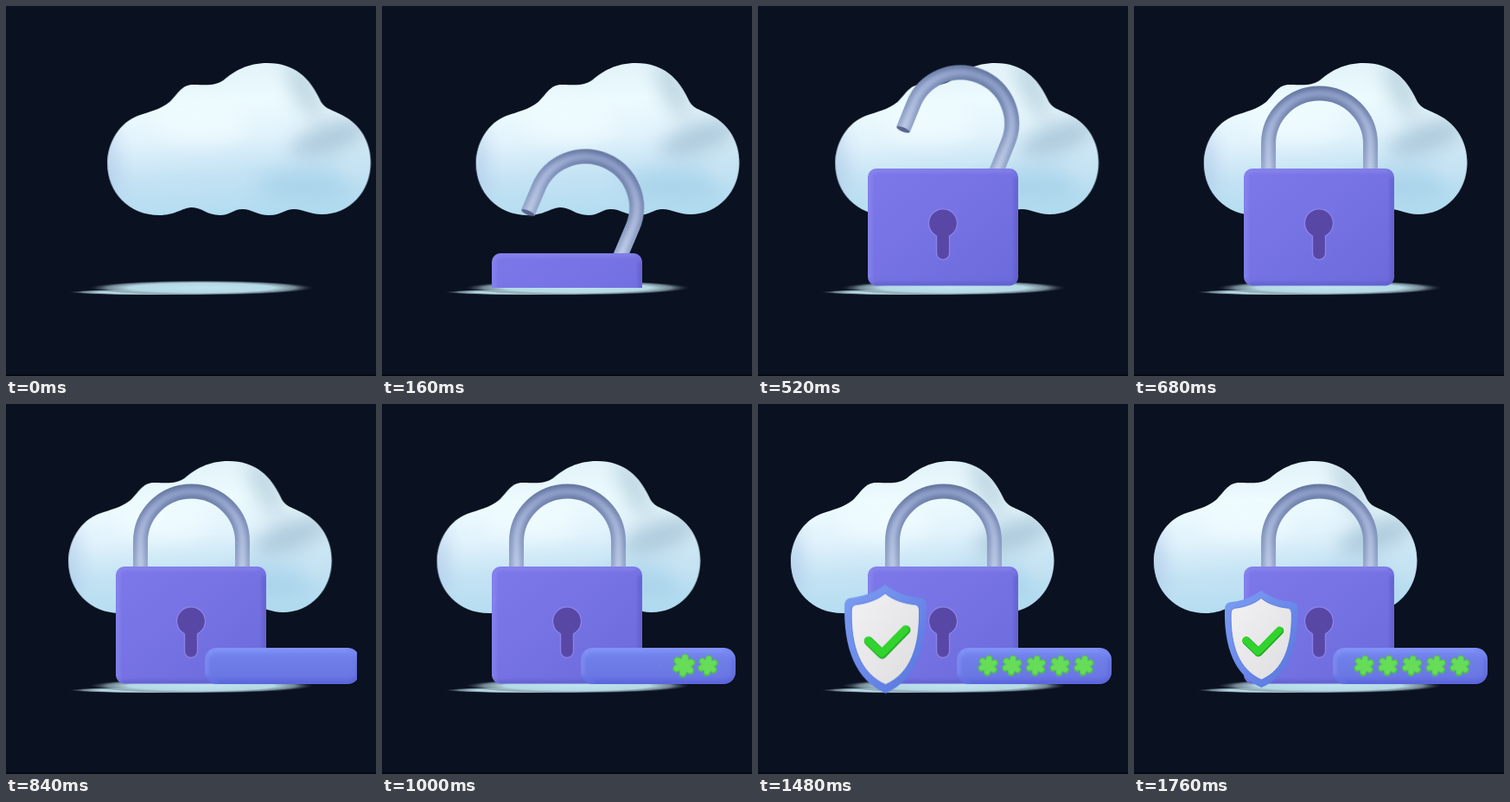
An HTML page that plays this animation: 428 px wide and 428 px high, repeating every 1.8 s.

```html
<!DOCTYPE html>
<html lang="en">
<head>
<meta charset="utf-8">
<title>Cloud security</title>
<style>
  html, body { margin: 0; width: 100%; height: 100%; overflow: hidden; background: #0a1120; }
  svg { display: block; width: 100vw; height: 100vh; }
  #shackle { transform-origin: 286px 199px; }
  #shield { transform-origin: 147px 271px; }
</style>
</head>
<body>
<svg viewBox="0 0 428 428">
  <defs>
    <linearGradient id="sky" x1=".42" y1="0" x2=".55" y2="1">
      <stop offset="0" stop-color="#e2f2f9"/>
      <stop offset=".25" stop-color="#ecfbfe"/>
      <stop offset=".48" stop-color="#e2f3fc"/>
      <stop offset=".72" stop-color="#c4e3f4"/>
      <stop offset="1" stop-color="#b2dcf0"/>
    </linearGradient>
    <radialGradient id="glow">
      <stop offset="0" stop-color="#bfe3ee"/>
      <stop offset=".65" stop-color="#b4d8e4"/>
      <stop offset=".84" stop-color="#8ba3ae" stop-opacity=".8"/>
      <stop offset="1" stop-color="#39424d" stop-opacity="0"/>
    </radialGradient>
    <linearGradient id="steel" gradientUnits="userSpaceOnUse" x1="0" y1="92" x2="0" y2="192">
      <stop offset="0" stop-color="#64769f"/>
      <stop offset=".45" stop-color="#7d8fb9"/>
      <stop offset="1" stop-color="#97a9cc"/>
    </linearGradient>
    <linearGradient id="shine" gradientUnits="userSpaceOnUse" x1="0" y1="92" x2="0" y2="192">
      <stop offset="0" stop-color="#8b9cc8"/>
      <stop offset=".4" stop-color="#a9b8dc"/>
      <stop offset="1" stop-color="#c4d2ea"/>
    </linearGradient>
    <linearGradient id="violet" x1="0" y1="0" x2="1" y2="1">
      <stop offset="0" stop-color="#7d78e9"/>
      <stop offset=".5" stop-color="#7572e3"/>
      <stop offset="1" stop-color="#6c6bdc"/>
    </linearGradient>
    <linearGradient id="indigo" x1="0" y1="0" x2="0" y2="1">
      <stop offset="0" stop-color="#7b8ef6"/>
      <stop offset=".3" stop-color="#6f7ee8"/>
      <stop offset=".75" stop-color="#6b78e3"/>
      <stop offset="1" stop-color="#5f6be2"/>
    </linearGradient>
    <linearGradient id="rim" x1="0" y1="0" x2="1" y2="1">
      <stop offset="0" stop-color="#7d9ef2"/>
      <stop offset=".55" stop-color="#6988ea"/>
      <stop offset="1" stop-color="#5873da"/>
    </linearGradient>
    <linearGradient id="plate" x1="0" y1="0" x2="1" y2="1">
      <stop offset="0" stop-color="#f2f1f4"/>
      <stop offset="1" stop-color="#dededf"/>
    </linearGradient>
    <filter id="soft" x="-60%" y="-60%" width="220%" height="220%"><feGaussianBlur stdDeviation="11"/></filter>
    <filter id="fine" x="-20%" y="-20%" width="140%" height="140%"><feGaussianBlur stdDeviation="2"/></filter>
    <path id="puff" d="M117 182C117 158 131 135 152 127C166 122 178 120 189 111C199 101 203 91 216 91C232 91 240 93 251 86C264 75 279 66 302 66C334 66 351 84 362 107C367 119 375 119 388 126C410 137 421.500 158 421.500 181C421.500 215 397 241 365 241C350 241 344 235 333 235C322 235 318 242 304 242C290 242 284 235 273 235C263 235 259 242 247 242C232 242 226 233 215 233C204 233 196 242 177 242C142 242 117 216 117 182Z"/>
    <path id="bow" d="M155.500 192V159.500A59 58.500 0 0 1 273.500 159.500V212" fill="none"/>
    <path id="crest" d="M147 215.500C137 224 123 228 110 229.500Q105 231 105 237C104 281 116 314 147.500 328C179 314 190 281 189.500 237Q189.500 231 185 229.500C171 228 157 224 147 215.500Z"/>
    <rect id="case" x="127" y="188" width="174" height="135.500" rx="10"/>
    <rect id="bar" x="230" y="282" width="179" height="42" rx="14"/>
    <clipPath id="inPuff"><use href="#puff"/></clipPath>
    <clipPath id="inCase"><use href="#case"/></clipPath>
    <clipPath id="inBar"><use href="#bar"/></clipPath>
    <clipPath id="above"><rect width="428" height="326"/></clipPath>
    <g id="star" fill="none" stroke-linecap="round" transform="rotate(8)">
      <path d="M0-8V8.500M-7.200-4L7.200 4.200M-7.200 4.200L7.200-4" stroke="#4dbf4b" stroke-width="8"/>
      <circle r="7.500" fill="#5fd455"/>
      <path d="M0-8V7.500M-7-4L6.700 3.700M-7 3.700L6.700-4" stroke="#66dc59" stroke-width="6"/>
    </g>
  </defs>

  <rect width="428" height="428" fill="#0a1120"/>
  <rect y="426.500" width="428" height="1.500" fill="#04070e"/>

  <g id="cloud">
    <use href="#puff" fill="url(#sky)"/>
    <g clip-path="url(#inPuff)">
      <g filter="url(#soft)">
        <ellipse cx="376" cy="152" rx="48" ry="17" fill="#9fbfd2" opacity=".75" transform="rotate(-20 376 152)"/>
        <ellipse cx="345" cy="96" rx="13" ry="36" fill="#a6c3d4" opacity=".7" transform="rotate(-25 345 96)"/>
        <ellipse cx="345" cy="208" rx="55" ry="16" fill="#9fcde7" opacity=".65"/>
        <ellipse cx="402" cy="186" rx="18" ry="13" fill="#cfe6f2" opacity=".6"/>
        <ellipse cx="117" cy="185" rx="11" ry="45" fill="#a9c4e6" opacity=".7"/>
        <ellipse cx="225" cy="135" rx="55" ry="22" fill="#f3feff" opacity=".6"/>
      </g>
    </g>
  </g>

  <ellipse cx="176" cy="331" rx="104" ry="3.500" fill="url(#glow)"/>
  <ellipse cx="226" cy="326" rx="130" ry="8.500" fill="url(#glow)"/>

  <g clip-path="url(#above)">
    <g id="lock">
      <g id="shackle">
        <use href="#bow" stroke="url(#steel)" stroke-width="17"/>
        <use href="#bow" stroke="url(#shine)" stroke-width="8" opacity=".85" filter="url(#fine)"/>
        <ellipse cx="155.500" cy="191.500" rx="8" ry="2.500" fill="#56628c"/>
      </g>
      <use href="#case" fill="url(#violet)"/>
      <g clip-path="url(#inCase)">
        <g fill="none" filter="url(#fine)">
          <path d="M129 318V198Q129 190 138 190H294" stroke="#9a98f6" stroke-width="3" opacity=".6"/>
          <path d="M299 198V314Q299 322 290 322H134" stroke="#5a55c2" stroke-width="4" opacity=".7"/>
        </g>
      </g>
      <path d="M206.500 266A16.500 16.500 0 1 1 221.500 266V286A7.500 7.500 0 0 1 206.500 286Z"
            fill="#5847a5" stroke="#8a82ea" stroke-width="1.400"/>
    </g>
  </g>

  <g id="pill">
    <use href="#bar" fill="url(#indigo)"/>
    <g clip-path="url(#inBar)" fill="none" filter="url(#fine)">
      <path d="M232 314V297Q232 284 246 284H394" stroke="#8b9ffc" stroke-width="3" opacity=".7"/>
      <path d="M407 295V309Q407 322 394 322H246" stroke="#5158cc" stroke-width="3" opacity=".6"/>
    </g>
  </g>
  <g id="stars"></g>

  <g id="shield">
    <use href="#crest" fill="url(#rim)"/>
    <use href="#crest" fill="url(#plate)" stroke="#5877dc" stroke-width="1" transform="translate(147.300 271.800) scale(.83 .84) translate(-147.300 -271.800)"/>
    <g fill="none" stroke-linecap="round" stroke-linejoin="round">
      <path d="M130 274L144 287.500L168.500 262.500" stroke="#1fa524" stroke-width="9.500"/>
      <path d="M129.500 273.300L143.500 286.800L168 261.800" stroke="#30d42c" stroke-width="8"/>
    </g>
  </g>
</svg>
<script>
  const LOOP = 1800;
  const $ = id => document.getElementById(id);

  // Each key is [time in ms, style]; an optional third item eases towards the next key.
  function run(el, keys) {
    const frames = keys.map(([at, style, easing = 'linear']) => ({ ...style, easing, offset: at / LOOP }));
    el.animate(frames, { duration: LOOP, iterations: Infinity });
  }

  const move = (x, y) => ({ transform: `translate(${x}px, ${y}px)` });
  const turn = deg => ({ transform: `rotate(${deg}deg)` });
  const size = k => ({ transform: `scale(${k})` });
  const wipe = right => ({ clipPath: `inset(0 ${right}% 0 0)` });

  function pop(el, start, length) {
    run(el, [
      [0, size(0)],
      [start, size(0), 'ease-out'],
      [start + length * 0.6, size(1.14), 'ease-in-out'],
      [start + length, size(1)],
      [LOOP, size(1)]
    ]);
  }

  run($('cloud'), [[0, move(0.4, 0)], [LOOP, move(-96.2, 0)]]);
  run($('lock'), [
    [0, move(0, 300), 'step-end'],
    [20, move(0, 137.5)],
    [510, move(0, 0)],
    [LOOP, move(0, 0)]
  ]);
  run($('shackle'), [
    [0, turn(23)],
    [500, turn(23), 'ease-in-out'],
    [650, turn(0)],
    [LOOP, turn(0)]
  ]);
  run($('pill'), [[0, wipe(100)], [690, wipe(100), 'ease-out'], [860, wipe(0)], [LOOP, wipe(0)]]);

  const SVG = 'http://www.w3.org/2000/svg';
  for (let i = 0; i < 5; i++) {
    const spot = document.createElementNS(SVG, 'g');
    const star = document.createElementNS(SVG, 'use');
    spot.setAttribute('transform', `translate(${377 - 27.7 * i} 302.5)`);
    star.setAttribute('href', '#star');
    spot.append(star);
    $('stars').append(spot);
    pop(star, 860 + 70 * i, 120);
  }

  pop($('shield'), 1320, 300);
</script>
</body>
</html>
```
